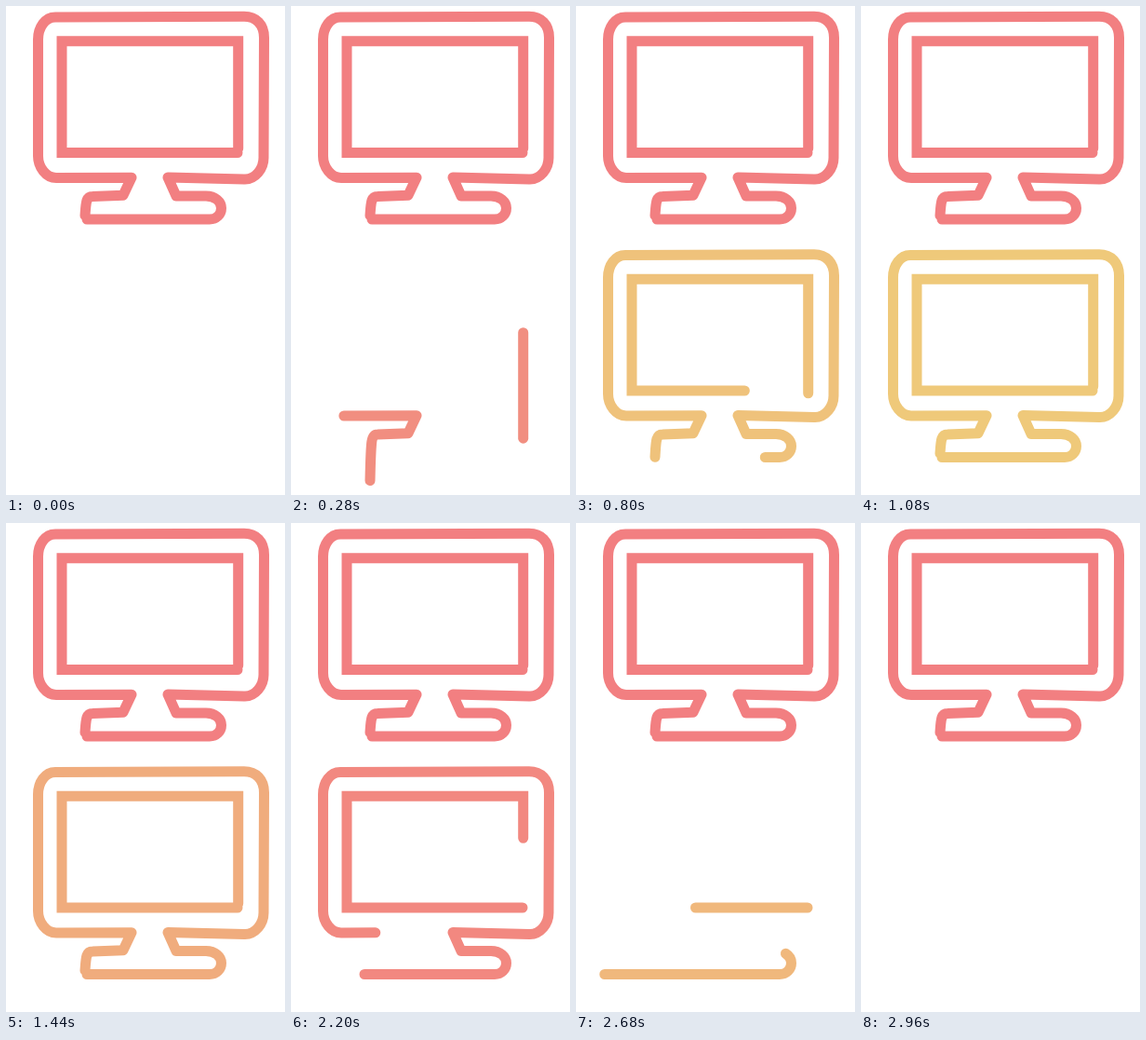
These frames come from a looping animation (300 by 525 pixels, 3000 ms). An HTML page:

```html
<!DOCTYPE html>
<html lang="en">
<head>
<meta charset="utf-8">
<title>Monitor line drawing</title>
<style>
  html, body { margin: 0; width: 100%; height: 100%; overflow: hidden; background: #fff; }
  svg { display: block; width: 300px; height: 525px; }
  path { fill: none; stroke-width: 11; stroke-linecap: round; }
  .case { stroke-linejoin: round; }
  .screen { stroke-linejoin: miter; }
</style>
</head>
<body>
<svg viewBox="0 0 300 525">
  <g id="still" stroke="#f27f81">
    <path class="case"/>
    <path class="screen"/>
  </g>
  <g id="live" transform="translate(0 255.5)">
    <path class="case" pathLength="1" stroke-dasharray="1 2"/>
    <path class="screen" pathLength="1" stroke-dasharray="1 2"/>
  </g>
</svg>
<script>
const LOOP = 3000, STEP = 40;
const DRAW = { start: 25, length: 975 };
const ERASE = { start: 2000, length: 950 };
const HOLDS = [[1440, 1640], [1840, 2040]];
const PINK = [242, 128, 129], YELLOW = [239, 202, 122];

// The open ends slide: `tail` lowers the first point, `reach` pulls the last one left.
const casePath = (tail, reach) =>
  `M85 ${225 + tail} C86 211 86 204.5 93 204.5 L126 203.2 L135 184.2 L54 184.5
   C43 184.5 34.5 173 34.5 161 V36 C34.5 23 42 12 53 12 L256 11.3
   C269 11.3 277.5 20 277.5 34 L277 163 C277 175 268 186 257 186
   L174 184 L183 204 H215 C225 204 231.5 210 231.5 217
   C231.5 224 226 229 219 229 H${87 - reach}`;

const screenPath = tail => `M249.7 ${153 + tail} V37.8 H60 V157.5 H249`;

const smooth = x => {
  const s = Math.min(1, Math.max(0, x));
  return s * s * (3 - 2 * s);
};
const progress = (t, span) => smooth((t - span.start) / span.length);

function colorAt(t) {
  const phase = t % 2000 / 1000;
  const mix = smooth(phase < 1 ? phase : 2 - phase);
  return `rgb(${PINK.map((c, i) => Math.round(c + (YELLOW[i] - c) * mix))})`;
}

const live = document.getElementById('live');
const [liveCase, liveScreen] = live.children;
const [stillCase, stillScreen] = document.getElementById('still').children;
stillCase.setAttribute('d', casePath(0, 0));
stillScreen.setAttribute('d', screenPath(0));

function render(time) {
  let t = Math.floor(time % LOOP / STEP) * STEP;
  const hold = HOLDS.find(([from, to]) => t >= from && t < to);
  if (hold) t = hold[0];

  const drawn = progress(t, DRAW), erased = progress(t, ERASE);
  const left = 1 - drawn;
  live.style.display = drawn > 0 && erased < 1 ? '' : 'none';
  live.setAttribute('stroke', colorAt(t));
  liveCase.setAttribute('d', casePath(35 * left, 70 * erased));
  liveScreen.setAttribute('d', screenPath(67 * left));
  for (const path of live.children) {
    path.setAttribute('stroke-dashoffset', left - erased);
  }
}

const begin = performance.now();
function tick() {
  render(performance.now() - begin);
  requestAnimationFrame(tick);
}
tick();
</script>
</body>
</html>
```
